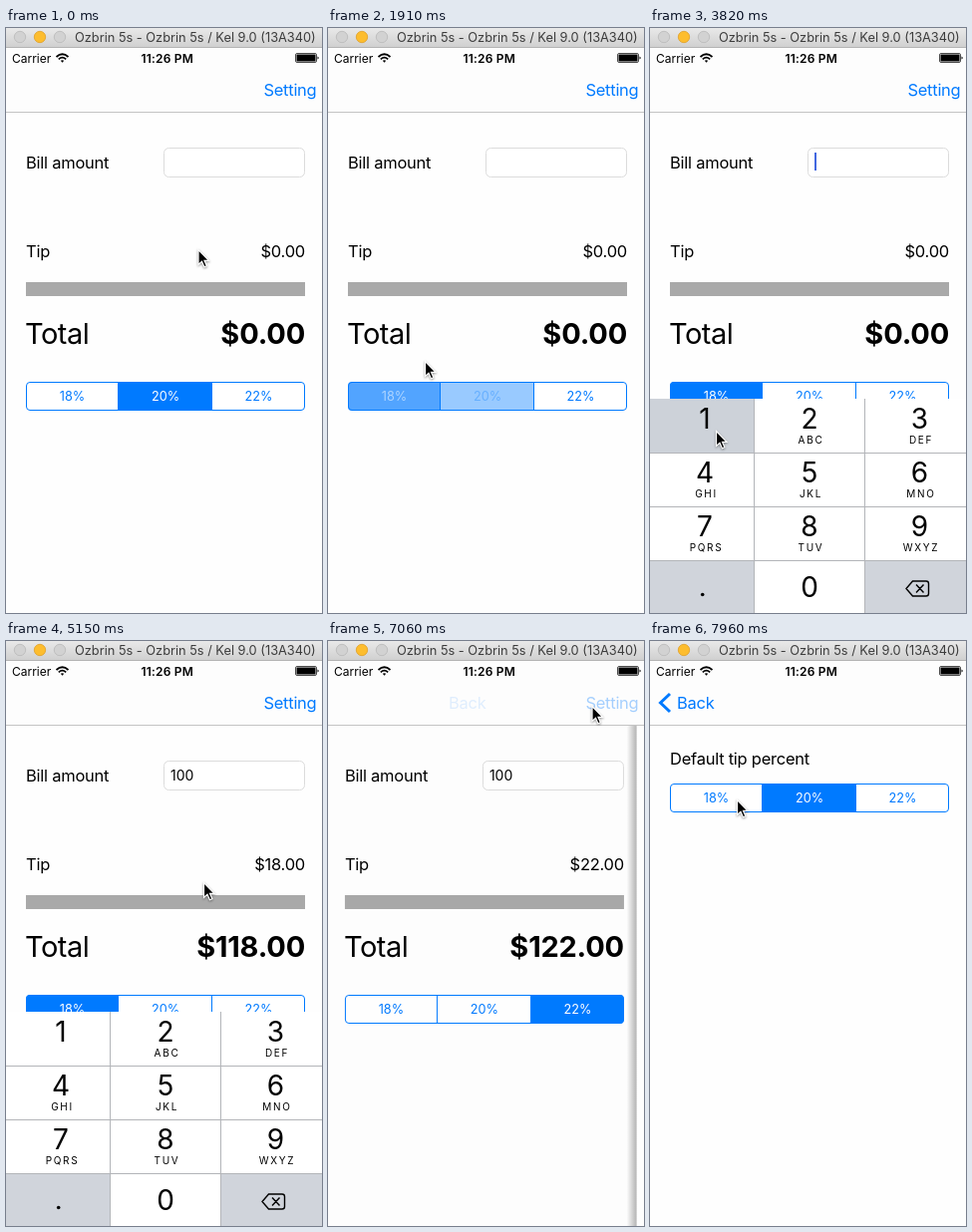
These frames come from a looping animation (317x587 px, 8000 ms). An HTML page:

```html
<!DOCTYPE html>
<html lang="en">
<head>
<meta charset="utf-8">
<title>Tip calculator</title>
<style>
  html, body { margin: 0; width: 100%; height: 100%; overflow: hidden; background: #fefefe; }
  svg { display: block; width: 317px; height: 587px; }
  text { font: 16.5px Inter, "Liberation Sans", sans-serif; font-optical-sizing: none; letter-spacing: -.25px; white-space: pre; }
  .end { text-anchor: end; }
  .mid { text-anchor: middle; }
  .title { font-size: 12.8px; letter-spacing: 0; fill: #3d3d3d; }
  .status { font-size: 12px; letter-spacing: 0; }
  .clock { font-size: 12px; font-weight: 600; letter-spacing: .2px; }
  .link { fill: #007aff; }
  .big { font-size: 29px; letter-spacing: -.5px; }
  .sum { font-size: 29px; font-weight: 700; letter-spacing: -.2px; }
  .field { font-size: 14px; letter-spacing: 0; }
  .seg text { font-size: 12.7px; letter-spacing: 0; text-anchor: middle; }
  .digit { font-size: 28px; letter-spacing: 0; text-anchor: middle; }
  .letters { font-size: 10px; letter-spacing: 1.7px; text-anchor: middle; }
</style>
</head>
<body>
<svg viewBox="0 0 317 587">
  <defs>
    <linearGradient id="chrome" x2="0" y2="1">
      <stop stop-color="#e9e9e9"/><stop offset="1" stop-color="#d0d0d0"/>
    </linearGradient>
    <linearGradient id="edge">
      <stop stop-color="#000" stop-opacity="0"/><stop offset="1" stop-color="#000" stop-opacity=".3"/>
    </linearGradient>
    <clipPath id="segShape"><rect x="20" width="280" height="29" rx="4"/></clipPath>
  </defs>
  <rect width="317" height="587" fill="#fefefe"/>

  <g id="main">
    <text x="20" y="140.5">Bill amount</text>
    <rect x="158.5" y="120.5" width="141" height="29" rx="5" fill="#fff" stroke="#dcdcdc"/>
    <text id="bill" class="field" x="165" y="140"></text>
    <rect id="caret" y="125" width="2" height="18" fill="#4268e0"/>
    <text x="20" y="229.5">Tip</text>
    <text id="tip" class="end" x="300" y="229.5"></text>
    <rect x="20" y="255" width="280" height="14" fill="#a9a9a9"/>
    <text class="big" x="19" y="317">Total</text>
    <text id="total" class="sum end" x="300" y="317"></text>
    <g id="mainSeg" class="seg" transform="translate(0 355)"></g>
  </g>
  <rect id="dim" y="85" width="317" height="502"/>

  <g id="settings">
    <rect x="-10" y="85" width="10" height="502" fill="url(#edge)"/>
    <rect y="85" width="320" height="502" fill="#fefefe"/>
    <text x="20" y="123.5">Default tip percent</text>
    <g id="defaultSeg" class="seg" transform="translate(0 143)"></g>
  </g>

  <rect y="19" width="317" height="65" fill="#fdfdfd"/>
  <path d="M0 84.5H317" stroke="#c4c4c4"/>
  <text id="setting" class="link end" x="311.5" y="68">Setting</text>
  <path id="chevron" d="M20 53L10.500 62L20 71" fill="none" stroke="#007aff" stroke-width="3"/>
  <text id="back" class="link" y="68">Back</text>

  <text class="status" x="6" y="34.500">Carrier</text>
  <g fill="none" stroke="#000" stroke-width="1.700">
    <path d="M50.500 29Q56.500 23.500 62.500 29M52.800 31.300Q56.500 28 60.200 31.300"/>
    <path d="M54.800 32.800Q56.500 31.500 58.200 32.800L56.500 34.800Z" fill="#000" stroke="none"/>
  </g>
  <text class="clock mid" x="161.7" y="34.500">11:26 PM</text>
  <rect x="290.5" y="25.5" width="21" height="9" rx="1.500" fill="none" stroke="#000" stroke-width=".7"/>
  <rect x="291.5" y="26.500" width="19" height="7" rx=".6"/>
  <path d="M312.500 28.500Q315 30 312.500 31.500Z"/>

  <rect width="317" height="19" fill="url(#chrome)"/>
  <path d="M0 19.500H317" stroke="#b4b4b4"/>
  <g stroke-width=".8">
    <circle cx="14" cy="9" r="5.700" fill="#d2d2d2" stroke="#b9b9b9"/>
    <circle cx="34" cy="9" r="5.700" fill="#fdbd2e" stroke="#e0a028"/>
    <circle cx="54" cy="9" r="5.700" fill="#d2d2d2" stroke="#b9b9b9"/>
  </g>
  <text class="title" x="69" y="14">Ozbrin 5s - Ozbrin 5s / Kel 9.0 (13A340)</text>

  <g id="keyboard"></g>
  <path id="cursor" d="M.5 .5V15.500L4 12.300L6.400 17.800L8.900 16.700L6.500 11.300H11Z"
    stroke="#fff" stroke-width="1.200" style="filter:drop-shadow(0 1px 1px #0006)"/>
</svg>

<script>
const LOOP = 8000, STEP = 147.2, LEAD = 15;
const $ = id => document.getElementById(id);
const LABELS = ['18%', '20%', '22%'];
const EDGES = [20, 112.5, 207, 300];

function buildSegments(group) {
  group.innerHTML = '<g clip-path="url(#segShape)"><rect x="20" width="280" height="29" fill="#fff"/>' +
    LABELS.map((_, i) => `<rect class="fill" x="${EDGES[i]}" width="${EDGES[i + 1] - EDGES[i]}" height="29" fill="#007aff"/>`).join('') +
    '</g><rect x="20.5" y=".5" width="279" height="28" rx="3.5" fill="none" stroke="#007aff"/>' +
    '<path d="M112.5 0V29M206.5 0V29" stroke="#007aff"/>' +
    LABELS.map((label, i) => `<text x="${[66.5, 160, 253.5][i]}" y="19.3">${label}</text>`).join('');
}

function paintSegments(group, levels) {
  const fills = group.querySelectorAll('.fill'), texts = group.querySelectorAll('text');
  levels.forEach((level, i) => {
    fills[i].setAttribute('opacity', level);
    texts[i].setAttribute('fill', `rgb(${255 * level},${122 + 133 * level},255)`);
  });
}

function buildKeyboard() {
  const letters = ['', 'ABC', 'DEF', 'GHI', 'JKL', 'MNO', 'PQRS', 'TUV', 'WXYZ'];
  const centers = [55, 160, 270.5];
  let html = '<rect y="372" width="317" height="215" fill="#fff"/>' +
    '<path d="M0 535H105V587H0ZM216 535H317V587H216Z" fill="#d0d4db"/>' +
    '<rect id="key1" y="372" width="104" height="54" fill="#cdd2d9"/>' +
    '<rect id="key0" x="105" y="535" width="110" height="52" fill="#cdd2d9"/>' +
    '<path d="M104.5 372V587M215.5 372V587M0 426.5H317M0 480.5H317M0 534.5H317" stroke="#b3b5b9"/>';
  letters.forEach((word, i) => {
    const x = centers[i % 3], y = 402 + 54 * Math.floor(i / 3);
    html += `<text class="digit" x="${x}" y="${y}">${i + 1}</text>` +
      `<text class="letters" x="${x + 1.5}" y="${y + 15}">${word}</text>`;
  });
  html += '<text class="digit" x="160" y="571">0</text><circle cx="52.7" cy="568.5" r="1.8"/>' +
    '<path d="M263.5 555H277Q279.500 555 279.500 557.500V567.500Q279.500 570 277 570H263.500L257 562.500Z' +
    'M267 558.500L274.500 566.500M274.500 558.500L267 566.500" fill="none" stroke="#000" stroke-width="1.4"/>';
  $('keyboard').innerHTML = html;
}

// Linear interpolation through [step, value...] points, held at both ends.
function track(points, n, slot = 1) {
  const i = points.findIndex(p => p[0] >= n);
  if (i < 0) return points[points.length - 1][slot];
  if (i === 0) return points[0][slot];
  const a = points[i - 1], b = points[i];
  return a[slot] + (b[slot] - a[slot]) * (n - a[0]) / (b[0] - a[0]);
}

const pointer = [
  [0, 192.5, 222], [3, 217, 169], [8, 156, 364], [11, 75, 364], [12, 70, 364], [13, 97, 334],
  [15, 227, 108], [16, 225, 128], [18, 220, 130], [23, 68, 400], [26, 66, 404], [27, 75, 420],
  [30, 157, 555], [33, 157, 555], [35, 198, 242], [36, 198, 242], [38, 175, 362], [40, 196.5, 369],
  [42, 245, 364], [44, 248, 364], [46, 265, 75], [48, 264.5, 65], [49, 264, 66], [53, 90, 160], [54, 87, 159]
];
const levels = [
  [[11, 0], [12, .2], [13, .68], [14, 1], [38, 1], [39, .5], [40, .05], [41, 0]],
  [[12, 1], [13, .4], [14, 0], [37, 0], [38, .2], [39, .7], [40, 1], [43, 1], [44, .4], [45, 0]],
  [[42, 0], [43, .2], [44, .68], [45, 1]]
];
const keyboardDrop = [[17, 216], [18, 150], [19, 50], [20, 10], [21, 0], [35, 0], [36, 60], [37, 165], [38, 216]];
const pushed = [[47, 0], [48, .032], [49, .5], [50, .82], [51, .96], [52, 1]];
const settingAlpha = [[46, 1], [47, .3], [48, .35], [49, .1], [50, 0]];

const shift = (id, x, y = 0) => $(id).setAttribute('transform', `translate(${x} ${y})`);
const fade = (id, alpha) => $(id).setAttribute('opacity', alpha);
const money = value => '$' + value.toFixed(2);

function draw(ms) {
  const n = Math.floor((ms + LEAD) / STEP);

  const bill = n >= 33 ? '100' : n >= 31 ? '10' : n >= 27 ? '1' : '';
  const percent = n >= 44 ? 22 : n < 13 || n >= 39 ? 20 : 18;
  const tip = bill * percent / 100;
  $('bill').textContent = bill;
  $('tip').textContent = money(tip);
  $('total').textContent = money(+bill + tip);
  $('caret').setAttribute('x', 165 + bill.length * 8.3);
  fade('caret', n >= 17 && n < 35 && (n - 17) % 7 < 4 ? 1 : 0);
  paintSegments($('mainSeg'), levels.map(points => track(points, n)));

  shift('keyboard', 0, track(keyboardDrop, n));
  fade('key1', n === 25 || n === 26 ? 1 : 0);
  fade('key0', n === 30 || n === 32 ? 1 : 0);

  const p = track(pushed, n);
  shift('main', -96 * p);
  shift('settings', 320 * (1 - p) + (p === 0 ? 20 : 0));
  fade('dim', .1 * p);
  fade('setting', track(settingAlpha, n));
  $('back').setAttribute('x', 27 + 97 * (1 - p));
  fade('back', p && Math.min(1, .08 + p));
  fade('chevron', p * p);

  shift('cursor', track(pointer, n), track(pointer, n, 2));
}

buildSegments($('mainSeg'));
buildSegments($('defaultSeg'));
paintSegments($('defaultSeg'), [0, 1, 0]);
buildKeyboard();

const start = performance.now();
function tick() {
  draw((performance.now() - start) % LOOP);
  requestAnimationFrame(tick);
}
tick();
</script>
</body>
</html>
```
